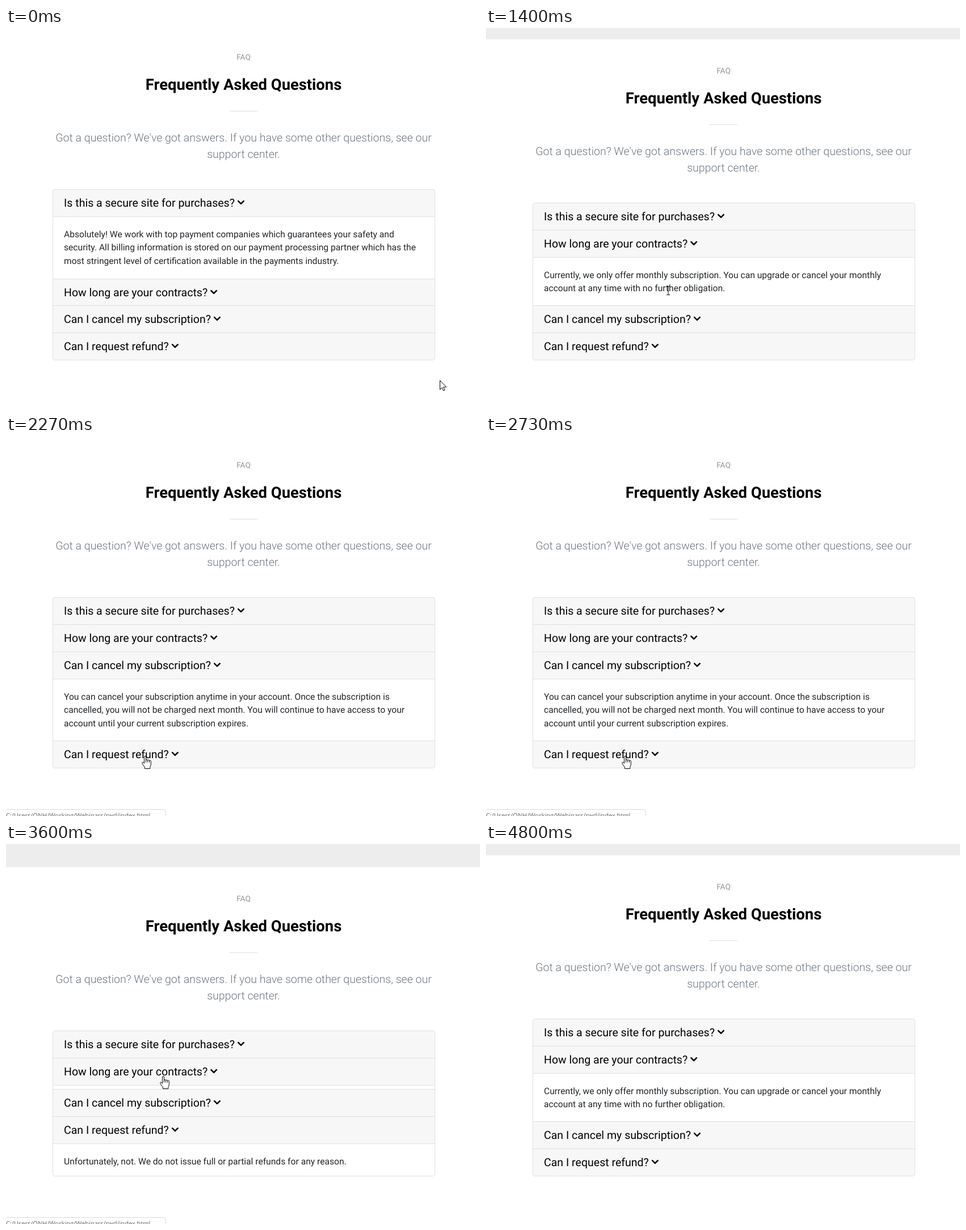
An HTML page for the animation above (5070 ms loop, 835x670 px).

```html
<!DOCTYPE html>
<html lang="en">
<head>
<meta charset="utf-8">
<title>FAQ accordion</title>
<style>
  html, body { margin: 0; width: 100%; height: 100%; overflow: hidden; background: #fff; }
  svg { display: block; }
  text { font-family: Roboto, sans-serif; text-rendering: geometricPrecision; white-space: pre; }
  .mid { text-anchor: middle; }
  .label { font-size: 13.68px; fill: #949494; }
  .title { font-size: 27.36px; font-weight: 700; fill: #000; }
  .lead { font-size: 19.54px; font-weight: 300; fill: #6c757d; }
  .question { font-size: 19.54px; fill: #000; }
  .answer { font-size: 15.63px; fill: #212529; }
  .path { font: 11.05px "Open Sans", sans-serif; fill: #5f6368; }
  .chevron { fill: none; stroke: #000; stroke-width: 2.6; stroke-linecap: round; stroke-linejoin: round; }
  .cursor { fill: #fff; stroke: #000; stroke-width: 1; stroke-linejoin: round; }
</style>
</head>
<body>
<svg id="stage" width="835" height="670" viewBox="0 0 835 670"></svg>
<script>
const LOOP = 5070, TICK = 200 / 3;
const LINE = '#dfdfdf';
const LEFT = 82, WIDTH = 674, BOTTOM = 585.2, HEADER = 47.87;
const LEADING = 23.44, PADDING = 39.07, COLLAPSE = 350;

const items = [
  ['Is this a secure site for purchases?', [
    'Absolutely! We work with top payment companies which guarantees your safety and',
    'security. All billing information is stored on our payment processing partner which has the',
    'most stringent level of certification available in the payments industry.']],
  ['How long are your contracts?', [
    'Currently, we only offer monthly subscription. You can upgrade or cancel your monthly',
    'account at any time with no further obligation.']],
  ['Can I cancel my subscription?', [
    'You can cancel your subscription anytime in your account. Once the subscription is',
    'cancelled, you will not be charged next month. You will continue to have access to your',
    'account until your current subscription expires.']],
  ['Can I request refund?', [
    'Unfortunately, not. We do not issue full or partial refunds for any reason.']]
];

// start time, closing item, opening item
const clicks = [[832, 0, 1], [1715, 1, 2], [2732, 2, 3], [3567, 3, 1]];

// time, x, y
const moves = [
  [0, 764, 621], [533, 321, 453], [600, 328, 454], [667, 319, 460], [733, 321, 462],
  [867, 321, 463], [1400, 321, 463], [1600, 299, 527], [2000, 299, 527], [2267, 245, 564],
  [2733, 245, 564], [2933, 257, 482], [3200, 276, 421], [3333, 277, 409],
  [4267, 277, 409], [4733, 50, 655], [4800, 20, 700], [5070, 20, 700]
];

// time from which each pointer shape is shown
const shapes = [
  [0, 'arrow'], [600, 'hand'], [930, 'beam'], [1465, 'arrow'], [1530, 'hand'],
  [1865, 'beam'], [2065, 'arrow'], [2130, 'hand'], [2865, 'arrow'], [2998, 'hand'],
  [3730, 'arrow'], [4330, 'beam'], [4398, 'arrow'], [4465, 'hand'], [4665, 'arrow']
];

// time, status bar opacity
const fades = [[0, 0], [866, 0], [866.5, 1], [1200, 1], [1400, 0], [1599, 0], [1599.5, 1], [3930, 1], [4130, 0], [5070, 0]];

const stage = document.getElementById('stage');

function add(parent, tag, attrs, text) {
  const node = document.createElementNS('http://www.w3.org/2000/svg', tag);
  set(node, attrs);
  if (text) node.textContent = text;
  return parent.appendChild(node);
}

function set(node, attrs) {
  for (const key in attrs) node.setAttribute(key, attrs[key]);
}

const shift = (node, x, y) => node.setAttribute('transform', `translate(${x} ${y})`);
const rule = (parent, y, x = LEFT, width = WIDTH) =>
  add(parent, 'rect', { x, y, width, height: 1, fill: LINE });

const band = add(stage, 'rect', { width: 835, height: 0, fill: '#ededed' });

// Heading, placed relative to the top of the card
const heading = add(stage, 'g', {});
[['label', -228, 'FAQ'],
 ['title', -175, 'Frequently Asked Questions'],
 ['lead', -84, "Got a question? We've got answers. If you have some other questions, see our"],
 ['lead', -55, 'support center.']
].forEach(([name, y, text]) => add(heading, 'text', { class: 'mid ' + name, x: 418.5, y }, text));
rule(heading, -138, 393.5, 50);

const card = add(stage, 'rect', { x: LEFT + .5, width: WIDTH - 1, rx: 4, fill: '#f7f7f7' });

const rows = items.map(([question, answer]) => {
  const panel = add(stage, 'svg', { x: LEFT, width: WIDTH });
  add(panel, 'rect', { width: WIDTH, height: 200, fill: '#fff' });
  answer.forEach((text, i) =>
    add(panel, 'text', { class: 'answer', x: 20, y: 36 + Math.round(i * LEADING) }, text));

  const head = add(stage, 'g', {});
  const label = add(head, 'text', { class: 'question', x: 102, y: 31 }, question);
  const x = 102 + label.getComputedTextLength() + 4.84;
  add(head, 'path', { class: 'chevron', d: `M${x + 1.4} 21.2l4.75 4.7 4.75-4.7` });
  return { panel, head, full: answer.length * LEADING + PADDING, top: rule(stage, 0), base: rule(stage, 0) };
});
rows[0].top.remove();

const outline = add(stage, 'rect', { x: LEFT + .5, width: WIDTH - 1, rx: 4, fill: 'none', stroke: LINE });

const status = add(stage, 'g', {});
add(status, 'rect', { x: -5, y: 658.5, width: 286, height: 30, rx: 4, fill: '#fff', stroke: '#d8dadd' });
add(status, 'text', { class: 'path', x: 0, y: 673 }, 'C:/Users/ONH/Working/Webinars/rwd/index.html');

const cursor = add(stage, 'g', { class: 'cursor' });
const pointers = {
  arrow: 'M.5.5V16.5L4.2 13 6.6 18.5 9 17.4 6.7 12H11.6Z',
  hand: 'M-1.5 13V2a1.5 1.5 0 0 1 3 0v6a1.5 1.5 0 0 1 3 .3a1.5 1.5 0 0 1 3 .6a1.4 1.4 0 0 1 2.8.8' +
    'V14.5q0 2.5-1.5 5V22.5H-.5V20Q-3 17-5 13.5q-1-2 .7-2.5q1 0 2.8 2ZM1.5 8v3.5M4.5 8.3v3.2M7.5 8.9v2.8',
  beam: 'M-3-7.5H-1Q0-7.5 0-6.5Q0-7.5 1-7.5H3M0-6.5V6.5M-3 7.5H-1Q0 7.5 0 6.5Q0 7.5 1 7.5H3'
};
for (const name in pointers) pointers[name] = add(cursor, 'path', { d: pointers[name] });
pointers.beam.setAttribute('fill', 'none');

// cubic-bezier(.25, .1, .25, 1)
function ease(x) {
  if (x <= 0) return 0;
  if (x >= 1) return 1;
  const bezier = (s, a, b) => 3 * s * (1 - s) ** 2 * a + 3 * s * s * (1 - s) * b + s ** 3;
  let low = 0, high = 1;
  for (let i = 0; i < 24; i++) {
    const s = (low + high) / 2;
    if (bezier(s, .25, .25) < x) low = s; else high = s;
  }
  return bezier(low, .1, 1);
}

const smooth = p => p * p * (3 - 2 * p);
const linear = p => p;

function sample(keys, t, curve) {
  const i = Math.max(1, keys.findIndex(key => key[0] > t));
  const a = keys[i - 1], b = keys[i];
  const p = curve((t - a[0]) / (b[0] - a[0]));
  return a.slice(1).map((v, n) => v + (b[n + 1] - v) * p);
}

function panelHeights(t) {
  const open = [1, 0, 0, 0];
  for (const [start, from, to] of clicks) {
    if (t < start) break;
    const p = ease((t - start) / COLLAPSE);
    open[from] = 1 - p;
    open[to] = p;
  }
  return rows.map((row, i) => row.full * open[i]);
}

function draw(t) {
  const heights = panelHeights(t);
  let y = BOTTOM - 4 * HEADER - heights.reduce((a, b) => a + b);
  const top = Math.round(y);

  band.setAttribute('height', Math.max(0, top - 288));
  shift(heading, 0, top);
  for (const box of [card, outline]) set(box, { y: top + .5, height: 585 - top });

  rows.forEach((row, i) => {
    const start = Math.round(y), base = Math.round(y + HEADER);
    y += HEADER + heights[i];
    const end = Math.round(y);
    shift(row.head, 0, start);
    row.top.setAttribute('y', start);
    row.base.setAttribute('y', base);
    set(row.panel, { y: base + 1, height: Math.max(0, end - base - 1) });
  });
  // The rounded outline already closes the card when the last panel is shut
  rows[3].base.setAttribute('visibility', heights[3] < 1 ? 'hidden' : 'visible');

  status.setAttribute('opacity', sample(fades, t, linear)[0]);

  const [cx, cy] = sample(moves, t, t < 533 || (t > 2000 && t < 2267) ? smooth : linear);
  shift(cursor, Math.round(cx), Math.round(cy));
  const shape = shapes.filter(key => key[0] <= t).pop()[1];
  for (const name in pointers) pointers[name].setAttribute('visibility', name === shape ? 'visible' : 'hidden');
}

const origin = performance.now();
function frame() {
  const t = (performance.now() - origin) % LOOP;
  draw(Math.min(75, Math.floor((t + 3.5) / TICK)) * TICK);
  requestAnimationFrame(frame);
}
frame();
</script>
</body>
</html>
```
